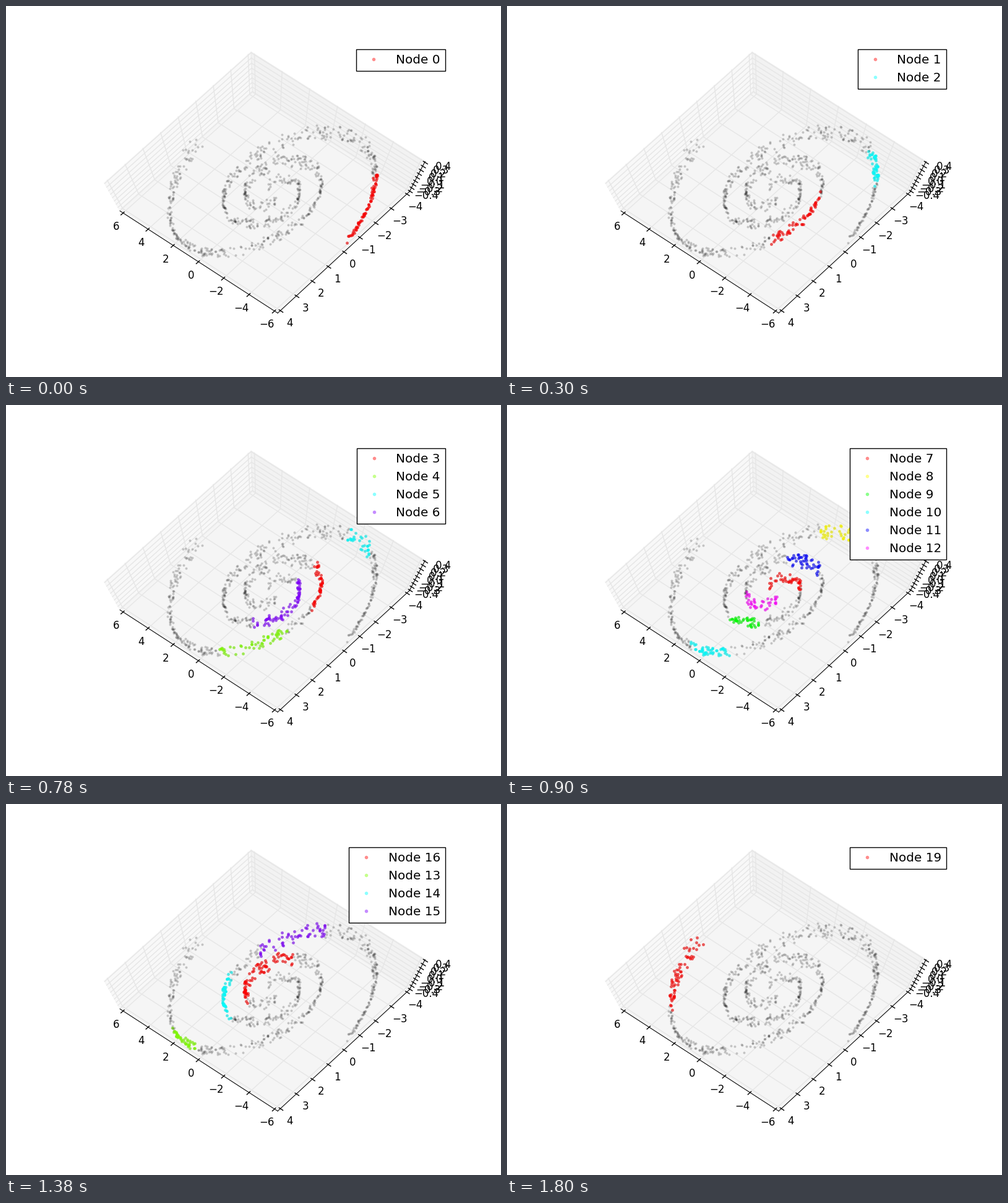
A matplotlib script for the animation above (2.1 s loop, 800 by 600 pixels).

```python
import colorsys
import numpy as np
import matplotlib.pyplot as plt
from matplotlib.animation import FuncAnimation
from matplotlib.lines import Line2D

plt.rcParams["font.family"] = "DejaVu Sans"

ELEV, AZIM = np.radians([80, 130])
SPAN = np.array([12, 8, 0.8])       # data range of x, y, z
H = 0.5 + 1 / 48                    # half size of the padded box
STEP = 1 / 12
LABEL_PAD = 12 * 48 / (72 * (6.2 + 4.8))

# Spiral radius by phase (in half turns), outside to inside
PHASE = [0, 0.35, 0.75, 1.2, 1.6, 2, 2.5, 2.95]
RADIUS = [5.6, 4.55, 2.9, 2.38, 1.82, 1.63, 0.88, 0.5]
CENTRE_X = -0.55

# Overlapping x intervals; clusters are named by arm and pass along it
LOW, SHIFT, WIDTH = -6.2, 1.56, 1.9
CLUSTERS = ["A0", "B0 A0", "B1 B0 A0 A1", "A2 A0 A1 B0 B1 B2",
            "B0 A1 A0 B1", "B0 A0", "B0"]


def project(p):
    """Unit-cube points (centred on 0) to stage pixels."""
    x, y, z = np.moveaxis(np.asarray(p, float), -1, 0)
    ce, se, ca, sa = np.cos(ELEV), np.sin(ELEV), np.cos(AZIM), np.sin(AZIM)
    along = ca * x + sa * y
    side = ca * y - sa * x
    depth = 10 - ce * along - se * z
    up = ce * z - se * along
    scale = np.array([620, 480]) / 0.185
    return np.stack([100 + scale[0] * (0.095 + side / depth),
                     540 - scale[1] * (0.095 + up / depth)], -1)


def spiral_arm(sign, rng, n=430, frayed=0.0):
    """Clean x of each sample, in order along the arm, and its pixel position."""
    phase = np.linspace(0, PHASE[-1], 800)
    r = np.interp(phase, PHASE, RADIUS)
    curve = sign * r * np.array([np.cos(np.pi * phase), np.sin(np.pi * phase)])
    dist = np.r_[0, np.cumsum(np.hypot(*np.diff(curve)))]
    s = np.sort(rng.uniform(0, dist[-1], n))
    x, y = (np.interp(s, dist, c) for c in curve)
    x += CENTRE_X
    jitter = 0.03 + frayed * np.exp(-(s / 2) ** 2)
    pos = np.stack([x + rng.normal(0, 1, n) * jitter,
                    y + rng.normal(0, 1, n) * jitter,
                    rng.uniform(-0.17, 0.17, n)], -1)
    return x, project(pos / SPAN)


def passes(x, low):
    idx = np.flatnonzero((x >= low) & (x <= low + WIDTH))
    return np.split(idx, np.flatnonzero(np.diff(idx) > 1) + 1)


def line(points, **kw):
    ax.plot(*project(points).T, **kw)


fig = plt.figure(figsize=(8, 6), dpi=100, facecolor="white")
ax = fig.add_axes([0, 0, 1, 1])
ax.set(xlim=(0, 800), ylim=(600, 0))
ax.axis("off")

# Panes
for corners, grey in [
    ([(H, H, -H), (H, -H, -H), (H, -H, H), (H, H, H)], 0.95),
    ([(H, -H, -H), (-H, -H, -H), (-H, -H, H), (H, -H, H)], 0.90),
    ([(H, H, -H), (-H, H, -H), (-H, -H, -H), (H, -H, -H)], 0.925),
]:
    ax.fill(*project(corners).T, fc=(grey,) * 3, ec=(grey,) * 3, alpha=0.5, lw=1, zorder=0)

# Grid, axis lines, ticks and labels
AXES = [
    (range(-6, 7, 2), (0, H, -H), 1, [(0, H, -H), (0, -H, -H), (0, -H, H)], "{:d}"),
    (range(-4, 5), (-H, 0, -H), 0, [(-H, 0, -H), (H, 0, -H), (H, 0, H)], "{:d}"),
    (np.arange(-4, 5) / 10, (-H, -H, 0), 0, [(H, H, 0), (H, -H, 0), (-H, -H, 0)], "{:.1f}"),
]
for i, (values, edge, tick_dir, path, fmt) in enumerate(AXES):
    edge = np.array(edge)
    unit = np.eye(3)
    line([edge - H * unit[i], edge + H * unit[i]], color="black", lw=0.75, zorder=2)
    for v in values:
        at = v / SPAN[i] * unit[i]
        line(np.array(path) + at, color="0.9", lw=1, zorder=1)
        pos = edge + at
        out = np.sign(edge) * STEP
        tick = out * unit[tick_dir]
        line([pos + 0.2 * tick, pos - 0.1 * tick], color="black", lw=1, zorder=2)
        ax.text(*project(pos + LABEL_PAD * out), fmt.format(v).replace("-", "\u2212"),
                size=12, ha="center", va="top", zorder=3)

# Point cloud
rng = np.random.default_rng(7)
arms = {"A": spiral_arm(-1, rng), "B": spiral_arm(1, rng, frayed=0.1)}
for _, px in arms.values():
    ax.scatter(*px.T, s=8, c="black", alpha=0.2, lw=0, zorder=4)

groups, keys = [], []
first = 0
for k, names in enumerate(CLUSTERS):
    nodes = sorted(enumerate(names.split(), first), key=lambda node: node[0] % 16)
    first += len(nodes)
    dots, handles = [], []
    for j, (number, (arm, turn)) in enumerate(nodes):
        color = colorsys.hsv_to_rgb(j / len(nodes), 1, 1)
        x, px = arms[arm]
        pts = px[passes(x, LOW + k * SHIFT)[int(turn)]]
        dots.append(ax.scatter(*pts.T, s=13, color=[color], alpha=0.55, lw=0,
                               zorder=5, visible=False))
        handles.append(Line2D([], [], ls="", marker="o", ms=4, mew=0, color=color,
                              alpha=0.45, label=f"Node {number}"))
    groups.append(dots)
    keys.append(handles)


def update(k):
    for i, dots in enumerate(groups):
        for d in dots:
            d.set_visible(i == k)
    legend = ax.legend(handles=keys[k], loc="upper right", bbox_to_anchor=(720, 60),
                       bbox_transform=ax.transData, fontsize=14.4, numpoints=1,
                       fancybox=False, framealpha=1, facecolor="white",
                       edgecolor="black", borderpad=0.4, labelspacing=0.5,
                       handlelength=2, handletextpad=0.8, borderaxespad=0.5)
    legend.get_frame().set_linewidth(1)
    legend.set_zorder(10)
    return [legend]


anim = FuncAnimation(fig, update, frames=len(CLUSTERS), interval=300,
                     repeat=True, repeat_delay=0, blit=False)
plt.show()
```
